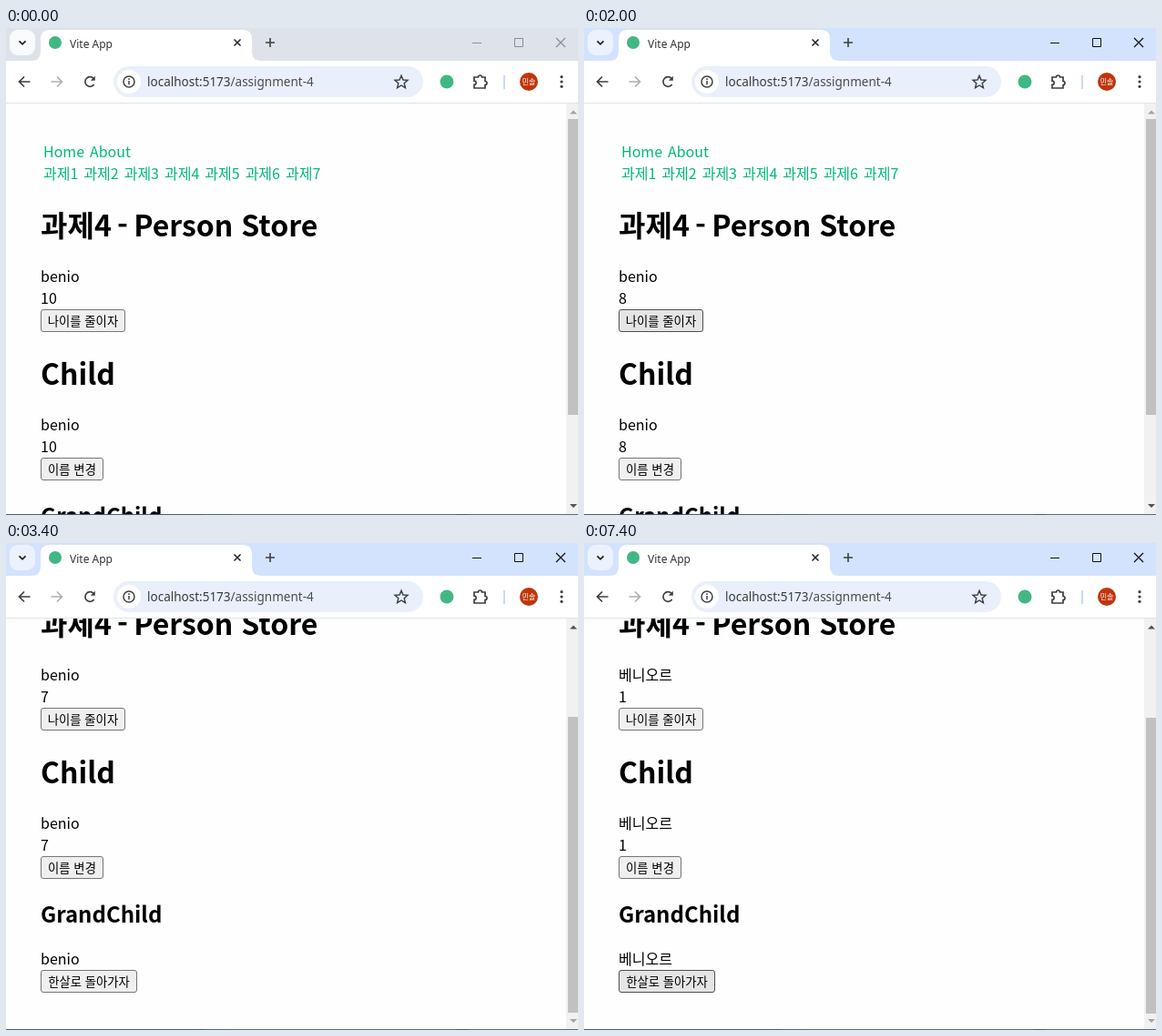
Animation, 628 px wide and 535 px high, one loop 8 s. Source, as an HTML page:

```html
<!DOCTYPE html>
<html lang="ko">
<head>
<meta charset="utf-8">
<title>Vite App</title>
<style>
html, body { margin: 0; width: 100%; height: 100%; overflow: hidden; background: #fff; }
svg { display: block; width: 628px; height: 535px; }
text { font-family: "Noto Sans CJK KR", "Noto Sans CJK", "Noto Sans", sans-serif; font-size: 16px; }
.ui { font-family: "Noto Sans", "Open Sans", sans-serif; }
.nav { fill: #00b67a; }
.h1 { font-size: 32px; font-weight: 700; }
.h1 .tight { word-spacing: -2.7px; }
.h2 { font-size: 24px; font-weight: 700; }
.icon { fill: none; stroke: #3c3f43; stroke-width: 1.7; }
.logo { fill: #41b883; }

/* every part shares one 8 s clock with hard changes */
.anim { animation: 8s step-end infinite; }
.bar { animation-name: bar; }
.pill { animation-name: pill; }
.win { fill: none; stroke: #111; animation-name: win; }
.page { animation-name: scroll; }
.thumb { animation-name: thumb; }
.up { animation-name: up; }
.down { animation-name: down; }
.btn rect { fill: #efefef; stroke: #767676; }
.btn text { font-size: 13.333px; text-anchor: middle; }
.b1 { animation-name: b1; }
.b2 { animation-name: b2; }
.b3 { animation-name: b3; }
.en { animation-name: en; }
.ko { animation-name: ko; }
.n10 { animation-name: n10; }
.n9 { animation-name: n9; }
.n8 { animation-name: n8; }
.n7 { animation-name: n7; }
.n1 { animation-name: n1; }

@keyframes bar { 0% { fill: #dde3e9; } 16.25%, 100% { fill: #d3e3fd; } }
@keyframes pill { 0% { fill: #f8fafc; } 16.25%, 100% { fill: #ebf2fe; } }
@keyframes win { 0% { stroke: #8b8f93; } 16.25%, 100% { stroke: #111; } }

@keyframes scroll {
  0% { transform: translateY(0); }
  40% { transform: translateY(-13px); }
  41.25% { transform: translateY(-82px); }
  42.5%, 100% { transform: translateY(-128px); }
}
@keyframes thumb {
  0% { transform: translateY(0); }
  40% { transform: translateY(9px); }
  41.25% { transform: translateY(59px); }
  42.5% { transform: translateY(91px); }
  43.75%, 100% { transform: translateY(92px); }
}
@keyframes up { 0% { fill: #a3a3a3; } 40%, 100% { fill: #505050; } }
@keyframes down { 0% { fill: #505050; } 42.5%, 100% { fill: #a3a3a3; } }

/* idle, hover and pressed button states */
@keyframes b1 {
  0%, 36.25%, 100% { fill: #efefef; stroke: #767676; }
  7.5%, 17.5%, 25%, 31.25% { fill: #e5e5e5; stroke: #4f4f4f; }
  16.25%, 23.75%, 30% { fill: #f5f5f5; stroke: #8d8d8d; }
}
@keyframes b2 {
  0%, 78.75%, 100% { fill: #efefef; stroke: #767676; }
  51.25%, 67.5%, 76.25% { fill: #e5e5e5; stroke: #4f4f4f; }
  66.25%, 75% { fill: #f5f5f5; stroke: #8d8d8d; }
}
@keyframes b3 {
  0% { fill: #efefef; stroke: #767676; }
  83.75%, 100% { fill: #e5e5e5; stroke: #4f4f4f; }
}

@keyframes en {
  0%, 67.5% { visibility: visible; }
  56.25%, 76.25%, 100% { visibility: hidden; }
}
@keyframes ko {
  0%, 67.5% { visibility: hidden; }
  56.25%, 76.25%, 100% { visibility: visible; }
}
@keyframes n10 { 0% { visibility: visible; } 17.5%, 100% { visibility: hidden; } }
@keyframes n9 { 0%, 25%, 100% { visibility: hidden; } 17.5% { visibility: visible; } }
@keyframes n8 { 0%, 31.25%, 100% { visibility: hidden; } 25% { visibility: visible; } }
@keyframes n7 { 0%, 92.5%, 100% { visibility: hidden; } 31.25% { visibility: visible; } }
@keyframes n1 { 0% { visibility: hidden; } 92.5%, 100% { visibility: visible; } }
</style>
</head>
<body>
<svg viewBox="0 0 628 535">
  <defs>
    <clipPath id="view"><rect y="83" width="615" height="451"/></clipPath>
  </defs>

  <rect width="628" height="535" fill="#fff"/>

  <!-- page -->
  <g clip-path="url(#view)">
    <rect y="83" width="615" height="451" fill="#fefefe"/>
    <g class="anim page">
      <g class="nav" id="nav">
        <text x="41" y="142">Home</text>
        <text x="92" y="142">About</text>
      </g>
      <text class="h1" x="38" y="229"><tspan class="tight">과제4 - </tspan>Person Store</text>
      <g class="btn">
        <rect class="anim b1" x="38.5" y="309.5" width="92" height="24" rx="2.5"/>
        <text x="84.5" y="326.5">나이를 줄이자</text>
      </g>
      <text class="h1" x="38" y="392">Child</text>
      <g class="btn">
        <rect class="anim b2" x="38.5" y="472.5" width="68" height="24" rx="2.5"/>
        <text x="72.5" y="489.5">이름 변경</text>
      </g>
      <text class="h2" x="38" y="545">GrandChild</text>
      <g class="btn">
        <rect class="anim b3" x="38.5" y="597.5" width="105" height="24" rx="2.5"/>
        <text x="91" y="614.5">한살로 돌아가자</text>
      </g>
      <g id="person"></g>
    </g>
  </g>

  <!-- scrollbar -->
  <rect x="615" y="83" width="13" height="451" fill="#f1f1f1"/>
  <rect class="anim thumb" x="617" y="100" width="11" height="325" fill="#c1c1c1"/>
  <path class="anim up" d="M619 94.5h8l-4-4z"/>
  <path class="anim down" d="M619 523h8l-4 4z"/>

  <!-- bottom edge -->
  <path d="M0 534.5H628" stroke="#5d6b74"/>
  <path d="M0 534.5H217M494 534.5H507" stroke="#3f6277"/>
  <path d="M217 534.5H246" stroke="#3f6f85"/>

  <!-- tab strip -->
  <rect class="anim bar" width="628" height="36"/>
  <rect class="anim pill" x="4" y="2" width="28" height="28" rx="9"/>
  <path class="icon" d="M14.5 14.3L18 17.8L21.5 14.3" style="stroke:#1f1f1f"/>
  <path d="M28 36Q38 36 38 26V12Q38 2 48 2H260Q270 2 270 12V26Q270 36 280 36Z" fill="#fff"/>
  <circle class="logo" cx="54" cy="16" r="7"/>
  <text class="ui" x="70" y="22" style="font-size:12px" fill="#333">Vite App</text>
  <path class="icon" d="M250.5 12.5l7 7m0-7l-7 7" style="stroke:#1f1f1f;stroke-width:1.5"/>
  <path class="icon" d="M285 16h10M290 11v10" style="stroke-width:1.6"/>
  <path class="anim win" d="M512 16.5h10M558.5 11.5h9v9h-9z"/>
  <path class="anim win" d="M604 11l10 10m0-10l-10 10" stroke-width="1.3"/>

  <!-- toolbar -->
  <rect y="36" width="628" height="46" fill="#fff"/>
  <path d="M0 82.5H628" stroke="#dde4ec"/>
  <path class="icon" d="M26.5 59H15M20 53.5L14.5 59L20 64.5"/>
  <path class="icon" d="M49.5 59H61M56 53.5L61.5 59L56 64.5" style="stroke:#adb0b3"/>
  <path class="icon" d="M96.6 62A5.3 5.3 0 1 1 96 55.3"/>
  <path d="M97.8 52.8v5h-5z" fill="#3c3f43"/>
  <rect x="118" y="42" width="340" height="34" rx="17" fill="#e9f0fb"/>
  <circle cx="135" cy="59" r="13" fill="#fff"/>
  <circle class="icon" cx="135" cy="59" r="6" style="stroke-width:1.5"/>
  <path class="icon" d="M135 58v4.3M135 55.3v1.6" style="stroke-width:1.5"/>
  <text class="ui" x="155" y="64" style="font-size:13.5px" fill="#3a3a3a">localhost:5173<tspan fill="#4d4d4d">/assignment-4</tspan></text>
  <path class="icon" d="M434 52.3l2 4.7 5 .4-3.8 3.3 1.2 5-4.4-2.700-4.400 2.700 1.200-5-3.800-3.300 5-.4z" style="stroke-width:1.4"/>
  <circle class="logo" cx="484" cy="59" r="7.5"/>
  <path class="icon" d="M514 54h4.5a2 2 0 0 1 4 0H526v4.5a2 2 0 0 1 0 4V66H514v-3.7a2.1 2.1 0 0 0 0-4.2z"/>
  <path d="M547 52v15" stroke="#c9daf4" stroke-width="2"/>
  <circle cx="574" cy="59" r="10" fill="#bf360c"/>
  <text x="574" y="62" text-anchor="middle" style="font-size:8px" fill="#fff">민솔</text>
  <g fill="#3c3f43">
    <circle cx="610" cy="53.7" r="1.6"/>
    <circle cx="610" cy="59" r="1.6"/>
    <circle cx="610" cy="64.3" r="1.6"/>
  </g>
</svg>
<script>
const [nav, person] = ["nav", "person"].map(id => document.getElementById(id));

function addText(parent, x, y, text, className = "") {
  const el = document.createElementNS("http://www.w3.org/2000/svg", "text");
  el.setAttribute("x", x);
  el.setAttribute("y", y);
  el.setAttribute("class", className);
  el.textContent = text;
  parent.append(el);
}

for (let i = 0; i < 7; i++) addText(nav, 41 + i * 44.33, 166, "과제" + (i + 1));

// all values lie on top of each other; the keyframes show one at a time
for (const y of [279, 442, 591]) {
  addText(person, 38, y, "benio", "anim en");
  addText(person, 38, y, "베니오르", "anim ko");
}
for (const y of [303, 466]) {
  for (const age of [10, 9, 8, 7, 1]) addText(person, 38, y, age, "anim n" + age);
}
</script>
</body>
</html>
```
